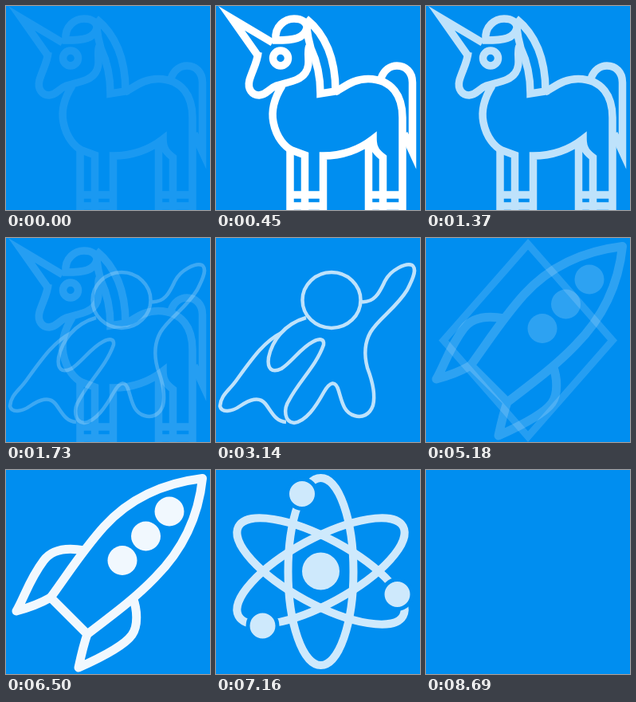
An HTML page for the animation above (8790 ms loop, 256x256 px).

```html
<!DOCTYPE html>
<html lang="en">
<head>
<meta charset="utf-8">
<title>Line icons</title>
<style>
  :root { --bg: #008ef0; }
  html, body { margin: 0; width: 100%; height: 100%; overflow: hidden; background: var(--bg); }
  svg { display: block; width: 100vw; height: 100vh; }
  .icon {
    fill: none; stroke: #fff; stroke-width: 9; stroke-miterlimit: 6;
    opacity: 0; animation: 8790ms linear infinite;
  }
  .solid { fill: #fff; stroke: none; }
  .electron { fill: #fff; stroke: var(--bg); stroke-width: 5; }
  .unicorn { animation-name: unicorn; stroke-width: 9.5; }
  .figure  { animation-name: figure; stroke-width: 4.5; }
  .diamond { animation-name: diamond; }
  .rocket  { animation-name: rocket; stroke-width: 11; stroke-linejoin: round; }
  .atom    { animation-name: atom; stroke-width: 10; }

  @keyframes unicorn { 0% { opacity: .1 } 5.12%, 13.88% { opacity: 1 } 20.71%, 100% { opacity: 0 } }
  @keyframes figure  { 0%, 18.32% { opacity: 0 } 24.12%, 34.02% { opacity: 1 } 40.84%, 100% { opacity: 0 } }
  @keyframes diamond { 0%, 37.77% { opacity: 0 } 43.57%, 53.13% { opacity: 1 } 59.95%, 100% { opacity: 0 } }
  @keyframes rocket  { 0%, 57.91% { opacity: 0 } 63.71%, 73.61% { opacity: 1 } 80.43%, 100% { opacity: 0 } }
  @keyframes atom    { 0%, 77.13% { opacity: 0 } 82.48%, 92.72% { opacity: 1 } 98.86%, 100% { opacity: 0 } }
</style>
</head>
<body>
<svg viewBox="0 0 256 256">
  <g class="icon unicorn">
    <!-- horn, head, forelock -->
    <path d="M71 46L19.500 15.500L53 63"/>
    <path d="M53 58C52 70 46 80 42 93C39 105 46 112 54 112C65 111 65 104 76 100C92 95 105 94 112 84C120 72 113 61 117 50"/>
    <path d="M75 43C73 25 87 16 98 16C108 16 115 21 114 28C110 41 98 43 75 43Z"/>
    <circle cx="81" cy="65.500" r="9.500"/>
    <!-- mane, back, tail -->
    <path d="M114 28C115 38 117 46 119 53C127 70 131 88 131 110L150 107C150 70 140 38 113 16"/>
    <path d="M149 108C164 100 173 91.500 191 91.500C222 92 234 114 234 140V256"/>
    <path d="M207 91C211 80 219 75 227 75C238 75 246.500 83 246.500 96V183L236 160"/>
    <!-- chest, belly, legs -->
    <path d="M83 100C73 116 69 131 72 146C76 166 87 177 95 181L111.500 187V256"/>
    <path d="M93 177V256M134.500 256V188C158 188 179 181 197 167C197 180 203 185 209.500 190V256M191.500 169V256"/>
    <path d="M89 237H139M89 251H139M187 237H238M187 251H238"/>
  </g>

  <g class="icon figure">
    <ellipse cx="145" cy="78" rx="36.500" ry="35"/>
    <path d="M182 80C200 82 206 66 212 54C219 40 238 31 246 34C252 38 249 48 240 65C226 88 204 101 194 118C186 132 186 148 190 163C198 184 200 198 197 210C193 222 183 226 174 223C160 219 158 205 154 192C150 178 143 180 135 194C125 212 113 230 98 232C86 231 84 215 92 203C104 180 126 160 135 134C136 126 130 126 122 130C106 138 96 155 82 164C70 170 64 164 66 150C70 130 85 108 113 100"/>
    <path d="M82 119C60 130 45 152 26 178C16 192 6 197 5 211C7 220 20 218 30 211C42 203 54 198 62 208C70 218 74 230 88 231"/>
  </g>

  <path class="icon diamond" d="M128 7.800L234 128.500L128 249.200L22 128.500Z"/>

  <g class="icon rocket">
    <path d="M246.500 10.500C193 17 153 38 123 71C96 101 78 130 56 160L102 206C129 185 159 164 187 135C219 103 241 64 246.500 10.500Z"/>
    <path d="M98 101C76 97 58 99 47 114C29 138 23 160 13 177C28 173 42 168 56 160"/>
    <path d="M159 160C165 175 166 196 158 207C148 221 118 236 91 248C94 234 97 220 102 206"/>
    <g class="solid">
      <circle cx="205" cy="52" r="18.500"/>
      <circle cx="175.500" cy="83" r="18.500"/>
      <circle cx="146" cy="113.500" r="18.500"/>
    </g>
  </g>

  <g class="icon atom">
    <ellipse cx="131.500" cy="127.500" rx="41" ry="117.500"/>
    <ellipse cx="131.500" cy="127" rx="117.500" ry="41" transform="rotate(28.500 131.500 127)"/>
    <ellipse cx="131.500" cy="127" rx="117.500" ry="41" transform="rotate(-28.500 131.500 127)"/>
    <circle class="solid" cx="131.500" cy="127" r="23.500"/>
    <g class="electron">
      <circle cx="108" cy="30" r="18.500"/>
      <circle cx="227.500" cy="156" r="18.500"/>
      <circle cx="58.500" cy="195.500" r="18.500"/>
    </g>
  </g>
</svg>
</body>
</html>
```
